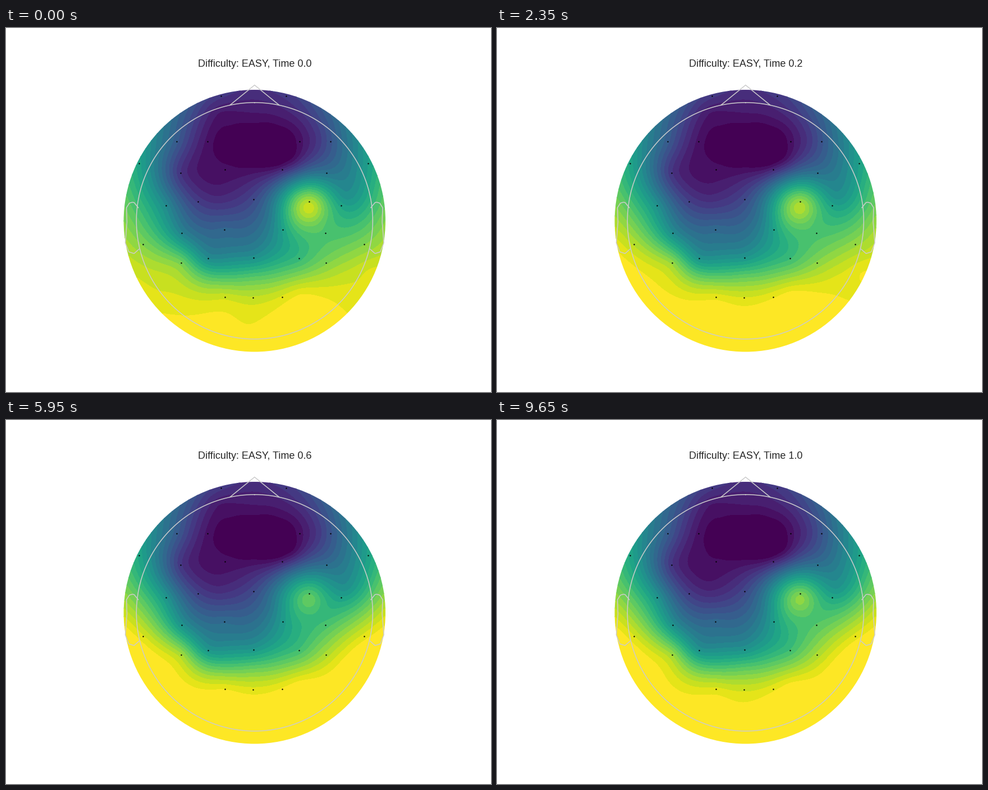
A matplotlib script for the animation above (10000 ms loop, 864x648 px).

```python
import numpy as np
import matplotlib.pyplot as plt
from matplotlib.animation import FuncAnimation
from matplotlib.patches import Circle

W, H, DPI = 864, 648, 108
FRAMES, INTERVAL = 200, 50
CX, CY, RIM, HEAD = 442.8, 343.24, 233.2, 210.5
BANDS = 25
GREY = "#cccccc"

# left half of the electrode cap, mirrored below, and its midline
LEFT = np.array([(382.5, 120.5), (304, 201.5), (358.5, 202), (237, 240.5), (311, 257.5),
                 (390, 252), (285, 316), (342, 308.5), (244, 384.5), (313, 365),
                 (389, 359), (312, 417.5), (360, 410), (390, 478.5)])
MIDLINE = np.array([(440.5, 304.5), (440.5, 408.5), (439.5, 479.5)])
CAP_AXIS = 440.8

# x, y and level of the main hills, hollows and slopes
KEY_POINTS = [
    (443, 209, -.08), (380, 150, .08), (343, 235, .08), (304, 203, .29), (311, 258, .16),
    (378, 300, .12), (491, 252, .12), (550, 195, .15), (572, 257, .38), (285, 316, .47),
    (440, 304, .22), (470, 335, .41), (540, 318, .91), (604, 300, .50), (313, 365, .45),
    (389, 359, .33), (360, 410, .48), (440, 408, .49), (523, 410, .66), (280, 400, .76),
    (312, 417, .77), (380, 458, .80), (440, 440, .70), (567, 417, .78), (390, 479, .905),
    (430, 522, .955), (525, 475, .962), (268, 480, .93), (600, 440, .89), (650, 438, .935),
]

# x, y, spread and the amount gained in the early, middle and late phase
DRIFTS = [
    (543, 322, 38, -.045, -.135, .07),
    (215, 400, 70, .08, .06, 0),
    (400, 530, 110, .04, .015, -.03),
    (660, 400, 70, .03, .12, 0),
    (375, 305, 40, 0, 0, -.02),
]
PHASES = [(.35, .8), (2.4, 5.2), (6, 8.4)]


def ease(t, start, end):
    u = np.clip((t - start) / (end - start), 0, 1)
    return u * u * (3 - 2 * u)


def ring(x, y, rx, ry, level, count, power=1.0):
    """Points around an oval; level is a function of the angle from the top."""
    a = np.linspace(-np.pi, np.pi, count, endpoint=False)
    s, c = np.sin(a), np.cos(a)
    return np.column_stack([x + rx * np.sign(s) * abs(s) ** power,
                            y - ry * np.sign(c) * abs(c) ** power, level(a)])


def kernel(a, b):
    """Thin plate kernel r^2 log r, in units of 100 pixels."""
    sq = ((a[:, None] - b[None]) ** 2).sum(-1) / 1e4
    return .5 * sq * np.log(sq + 1e-12)


def affine(p):
    return np.column_stack([np.ones(len(p)), (p - (CX, CY)) / 100])


def thin_plate(points, levels, targets, smooth=.002):
    n = len(points)
    base = affine(points)
    system = np.zeros((n + 3, n + 3))
    system[:n, :n] = kernel(points, points) + smooth * np.eye(n)
    system[:n, n:] = base
    system[n:, :n] = base.T
    weights = np.linalg.solve(system, np.append(levels, np.zeros(3)))
    return kernel(targets, points) @ weights[:n] + affine(targets) @ weights[n:]


control = np.vstack([
    KEY_POINTS,
    ring(CX, CY, RIM, RIM, lambda a: .15 + .84 * (1 - np.exp(-(a / 1.29) ** 2)), 24),
    ring(443, 209, 75, 40, lambda a: .04 + 0 * a, 12, power=.75),
    ring(541, 318, 37, 37, lambda a: .68 - .07 * np.cos(a), 8),
])

axis = np.linspace(-RIM - 3, RIM + 3, 125)
gx, gy = np.meshgrid(CX + axis, CY + axis)
targets = np.column_stack([gx.ravel(), gy.ravel()])
rest = thin_plate(control[:, :2], control[:, 2], targets).reshape(gx.shape)
bumps = [np.exp(-((gx - x) ** 2 + (gy - y) ** 2) / (2 * s * s))
         for x, y, s, *_ in DRIFTS]

fig = plt.figure(figsize=(W / DPI, H / DPI), dpi=DPI, facecolor="white")
ax = fig.add_axes([0, 0, 1, 1])
ax.set_xlim(0, W)
ax.set_ylim(H, 0)
ax.set_autoscale_on(False)
ax.axis("off")

disc = Circle((CX, CY), RIM, transform=ax.transData)
colors = plt.get_cmap("viridis")(np.linspace(0, 1, BANDS))
edges = np.linspace(0, 1, BANDS + 1)

# head outline, nose and ears
ear_x = 421 * np.array([.492, .510, .518, .5299, .5419, .54, .547, .532, .510, .489])
ear_y = CY - 421 * np.array([.0555, .0775, .0783, .0746, .0555,
                             -.0055, -.0932, -.1313, -.1384, -.1199])
turn = np.linspace(0, 2 * np.pi, 201)
outlines = [(CX + HEAD * np.sin(turn), CY - HEAD * np.cos(turn)),
            ([CX - 44, CX, CX + 44], [137.4, 101.6, 137.4]),
            (CX + ear_x, ear_y), (CX - ear_x, ear_y)]
for xs, ys in outlines:
    ax.plot(xs, ys, color=GREY, lw=1, zorder=4)

mirrored = LEFT * (-1, 1) + (2 * CAP_AXIS, 0)
sensors = np.vstack([LEFT, mirrored, MIDLINE])
ax.plot(*sensors.T, "o", color="black", ms=1.6, mew=0, zorder=3)

title = ax.text(CX, 68.76, "", ha="center", va="baseline", fontsize=12,
                family="Liberation Sans", color="#262626")
shown = []


def update(frame):
    seconds = frame * INTERVAL / 1000
    phases = [ease(seconds, *span) for span in PHASES]
    field = rest + sum(np.dot(drift[3:], phases) * bump
                       for drift, bump in zip(DRIFTS, bumps))
    while shown:
        shown.pop().remove()
    filled = ax.contourf(gx, gy, np.clip(field, .001, .999),
                         levels=edges, colors=colors, zorder=1)
    filled.set_clip_path(disc)
    shown.append(filled)
    ax.set_xlim(0, W)
    ax.set_ylim(H, 0)
    title.set_text(f"Difficulty: EASY, Time {frame / FRAMES:.1f}")
    return filled, title


anim = FuncAnimation(fig, update, frames=FRAMES, interval=INTERVAL,
                     repeat=True, repeat_delay=0, blit=False)
plt.show()
```
